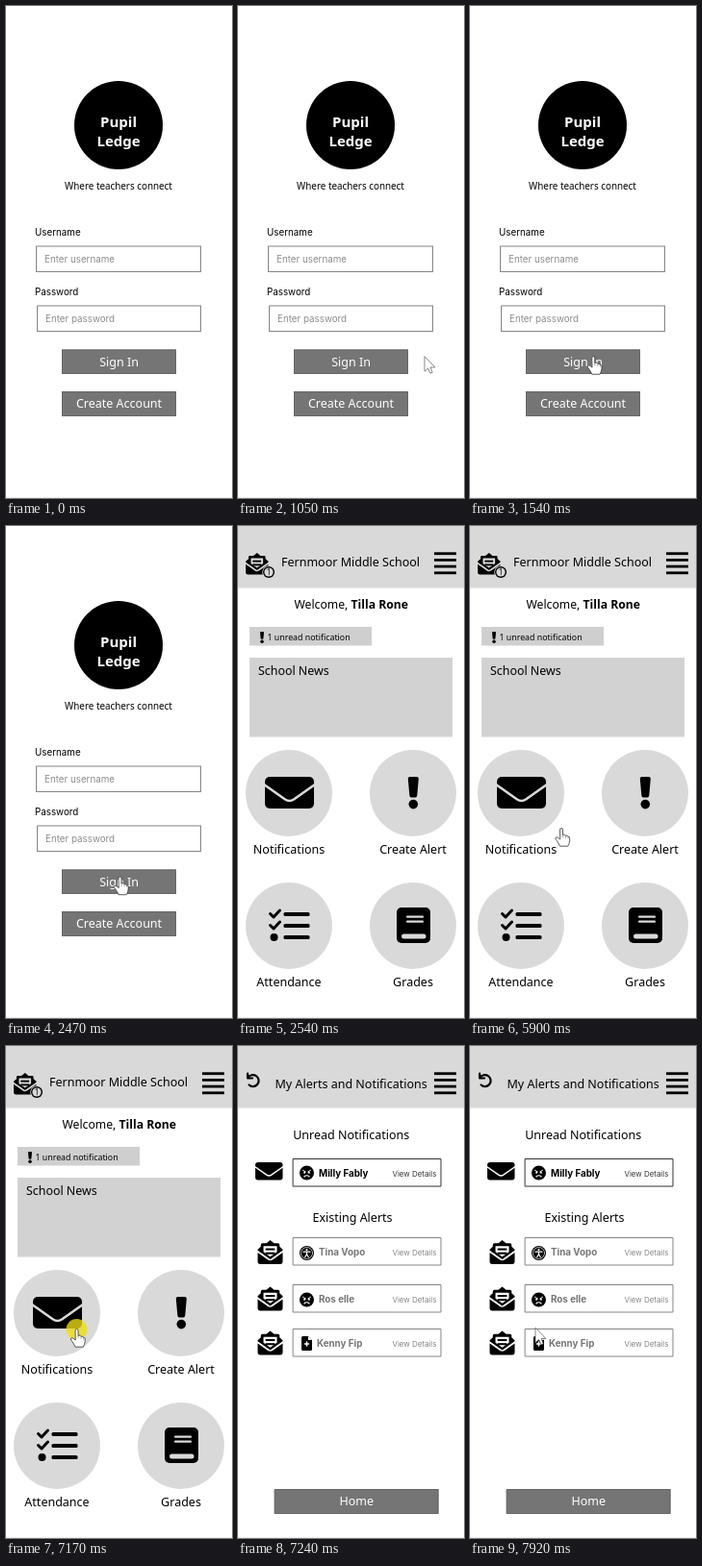
An HTML page with a canvas for the animation above (7990 ms loop, 235x512 px).

```html
<!DOCTYPE html>
<html lang="en">
<head>
<meta charset="utf-8">
<title>School app walkthrough</title>
<style>
html, body { margin: 0; width: 100%; height: 100%; overflow: hidden; background: #fff; }
canvas { display: block; width: 235px; height: 512px; }
</style>
</head>
<body>
<canvas></canvas>
<script>
const W = 235, H = 512, LOOP = 7990;
const PANEL = '#d9d9d9', GREY = '#757575';
const NOTO = '"Noto Sans", "Open Sans", sans-serif';
const INTER = 'Inter, Roboto, sans-serif';
const canvas = document.querySelector('canvas');
const ctx = canvas.getContext('2d');
const dpr = window.devicePixelRatio || 1;
canvas.width = W * dpr;
canvas.height = H * dpr;

function rect(x, y, w, h, color) {
  ctx.fillStyle = color;
  ctx.fillRect(x, y, w, h);
}

function frame(x, y, w, h, color) {
  ctx.strokeStyle = color;
  ctx.lineWidth = 1;
  ctx.strokeRect(x + 0.5, y + 0.5, w - 1, h - 1);
}

function disc(x, y, r, color = '#000') {
  ctx.fillStyle = color;
  ctx.beginPath();
  ctx.arc(x, y, r, 0, 7);
  ctx.fill();
}

function rounded(x, y, w, h, r, color = '#000') {
  ctx.fillStyle = color;
  ctx.beginPath();
  ctx.roundRect(x, y, w, h, r);
  ctx.fill();
}

function shape(d, color = '#000') {
  ctx.fillStyle = color;
  ctx.fill(new Path2D(d));
}

function line(d, width, color = '#000') {
  ctx.strokeStyle = color;
  ctx.lineWidth = width;
  ctx.lineCap = ctx.lineJoin = 'round';
  ctx.stroke(new Path2D(d));
}

function text(str, x, y, size, { color = '#000', weight = 400, family = NOTO, align = 'left' } = {}) {
  ctx.font = `${weight} ${size}px ${family}`;
  ctx.fillStyle = color;
  ctx.textAlign = align;
  ctx.fillText(str, x, y);
}

// Runs draw in a local coordinate system.
function at(x, y, scale, draw) {
  ctx.save();
  ctx.translate(x, y);
  ctx.scale(scale, scale);
  draw();
  ctx.restore();
}

function button(label, x, y, w, h) {
  rect(x, y, w, h, GREY);
  frame(x, y, w, h, '#676767');
  text(label, x + w / 2, y + 17, 12.5, { color: '#fff', align: 'center' });
}

function envelope(x, y, w, bg) {
  at(x, y, w / 51, () => {
    rounded(0, 0, 51, 33, 5);
    line('M-1 8 L21 23.5 Q25.5 26.5 30 23.5 L52 8', 2.6, bg);
  });
}

function openMail(x, y, w, bg) {
  at(x, y, w / 512, () => {
    shape('M0 211V190L64 135V96Q64 64 96 64H176L256 0L336 64H416Q448 64 448 96V135L512 190V211L256 392Z');
    shape('M118 122H394V240L256 338L118 240Z', bg);
    rect(160, 168, 192, 40, '#000');
    rect(160, 250, 192, 40, '#000');
    shape('M0 254L209 405Q256 432 303 405L512 254V440Q512 490 462 490H50Q0 490 0 440Z');
  });
}

function exclamation(x, y, scale) {
  at(x, y, scale, () => {
    shape('M-5.5 2Q-5.5 0 -3.5 0H3.5Q5.5 0 5.5 2L4 19Q3.8 21.5 2 21.5H-2Q-3.8 21.5 -4 19Z');
    disc(0, 28.6, 4.8);
  });
}

function checklist(x, y) {
  at(x, y, 1, () => {
    line('M1.5 4.5L5 8L11.5 1', 3);
    line('M1.5 16.5L5 20L11.5 13', 3);
    disc(5.5, 29, 4);
    for (const row of [3, 15, 27]) rounded(15.5, row, 27, 4, 1.5);
  });
}

function book(x, y) {
  rounded(x, y, 35, 37, 5);
  rounded(x + 10, y + 8.5, 18, 2.3, 1, PANEL);
  rounded(x + 10, y + 13.5, 18, 2.3, 1, PANEL);
  rounded(x + 5, y + 27.5, 25.5, 5, 2.5, PANEL);
}

function angryFace(x, y) {
  disc(x, y, 7.5);
  line(`M${x - 4} ${y - 2.7}l2.8 1.6M${x + 4} ${y - 2.7}l-2.8 1.6`, 1, '#fff');
  disc(x - 2.4, y - 0.3, 1, '#fff');
  disc(x + 2.4, y - 0.3, 1, '#fff');
  line(`M${x - 2.6} ${y + 4}q2.6 -2.6 5.2 0`, 1.1, '#fff');
}

function accessFigure(x, y) {
  disc(x, y, 7.5);
  ctx.beginPath();
  ctx.arc(x, y, 6, 0, 7);
  ctx.strokeStyle = '#fff';
  ctx.lineWidth = 0.7;
  ctx.stroke();
  disc(x, y - 3.4, 1.1, '#fff');
  line(`M${x - 3.5} ${y - 1.3}h7M${x} ${y - 1.3}v2.3M${x - 1.8} ${y + 4.2}l1.8 -3.2l1.8 3.2`, 1.2, '#fff');
}

function documentIcon(x, y) {
  at(x, y, 1, () => {
    shape('M0 1.5Q0 0 1.5 0H7L11 4V13.5Q11 15 9.5 15H1.5Q0 15 0 13.5Z');
    shape('M7 0V4H11Z', '#fff');
    line('M5.5 6V10M3.5 8H7.5', 1.5, '#fff');
  });
}

function header(title, x, y) {
  rect(0, 0, W, 64.5, PANEL);
  text(title, x, y, 12.5);
  for (let i = 0; i < 4; i++) rect(204, 27.3 + i * 6.7, 23, 2.8, '#000');
}

function field(label, hint, x, y, w, h) {
  text(label, 30, y - 10.5, 9.8, { family: INTER });
  frame(x, y, w, h, '#858585');
  text(hint, x + 9, y + h - 10, 9.8, { color: '#8c8c8c', family: INTER });
}

function signInScreen() {
  disc(117, 124, 46);
  const mark = { color: '#fff', weight: 700, align: 'center' };
  text('Pupil', 117, 126, 15, mark);
  text('Ledge', 117, 146, 15, mark);
  text('Where teachers connect', 117, 190.5, 9.85, { align: 'center' });
  field('Username', 'Enter username', 31, 249.5, 172, 27.5);
  field('Password', 'Enter password', 32, 311.5, 171, 27.5);
  button('Sign In', 58, 357.5, 119, 25.5);
  button('Create Account', 58, 401, 119, 26);
}

function homeScreen() {
  header('Fernmoor Middle School', 45, 42);
  openMail(8, 28, 23.5, PANEL);
  disc(32, 48, 6.8, PANEL);
  disc(32, 48, 6);
  disc(32, 48, 4.6, PANEL);
  text('1', 32, 51, 8, { align: 'center' });
  text('Welcome, ', 58.5, 86, 12.2);
  const nameX = 58.5 + ctx.measureText('Welcome, ').width;
  text('Tilla Rone', nameX, 86, 12.2, { weight: 700 });

  rect(12, 105, 127, 19.5, '#cfcfcf');
  exclamation(25, 110, 0.36);
  text('1 unread notification', 30.5, 118.5, 8.8);
  rect(12, 137, 211, 82.5, '#d2d2d2');
  text('School News', 21, 154.8, 12.4);

  const tiles = [
    ['Notifications', 53, 278], ['Create Alert', 182, 278],
    ['Attendance', 53, 416], ['Grades', 182, 416]
  ];
  for (const [label, x, y] of tiles) {
    disc(x, y, 45, PANEL);
    text(label, x, y + 63, 12.5, { align: 'center' });
  }
  envelope(28, 261, 51, PANEL);
  exclamation(182.3, 261, 1);
  checklist(32, 399);
  book(165, 397);
}

function alertRow(name, nameX, y, unread) {
  const border = unread ? '#333' : '#858585';
  frame(57, y, 154.5, 29.5, border);
  text(name, nameX, y + 18.6, 9.8, { color: unread ? '#000' : GREY, weight: 700, family: INTER });
  text('View Details', 160.5, y + 18.6, 7.9, { color: border, family: INTER });
}

function alertsScreen() {
  header('My Alerts and Notifications', 38.5, 44);
  line('M10 28.5V33.5H15M10.3 33.2A6 6 0 1 1 11.5 40.5', 2.2);
  text('Unread Notifications', 117.7, 96.7, 12.5, { align: 'center' });
  text('Existing Alerts', 119, 183, 12.5, { align: 'center' });
  envelope(18, 121, 28.5, '#fff');
  for (const y of [202, 250.5, 296.5]) openMail(20.5, y, 26, '#fff');
  alertRow('Milly Fably', 84, 117, true);
  alertRow('Tina Vopo', 84, 199);
  alertRow('Ros elle', 84, 248);
  alertRow('Kenny Fip', 82, 294);
  angryFace(71.5, 132);
  accessFigure(71.5, 215.5);
  angryFace(71.5, 264);
  documentIcon(66, 302);
  button('Home', 38, 461, 170.5, 26);
}

const ARROW = 'M0 0V15.2L3.6 12L5.9 17.2L8.2 16.2L6 11H10.5Z';
const HAND = 'M-2 1.6Q-2 0 -.5 0Q1 0 1 1.6V6.8Q3.4 6 4 7.8Q6 7 6.5 8.9Q8.2 8.5 8.2 10.3V13Q8 16 6.2 18.7H-2Q-3 15.7 -6 12Q-7.5 10 -6 9.3Q-4.5 8.9 -2 11.3Z';

// Pointer moves: start, end, steps, from, to.
const MOVES = [
  [500, 850, 6, [236, 377], [198, 366]],
  [1050, 1050, 1, [198, 366], [194, 365]],
  [1120, 1610, 8, [194, 365], [120, 364.5]],
  [1940, 1940, 1, [120, 364.5], [119.5, 365]],
  [4600, 4600, 1, [118, 364.5], [118, 364.5]],
  [4860, 5060, 3, [118, 364.5], [120, 360.5]],
  [5130, 5340, 4, [120, 360.5], [121, 365]],
  [5620, 5900, 5, [121, 365], [96, 314.5]],
  [5970, 6300, 6, [96, 314.5], [74.5, 294.5]],
  [7850, 7850, 1, [74, 293.5], [74, 293.5]],
  [7920, 7920, 1, [74, 293.5], [68, 293.5]]
];

function pointerAt(t) {
  const hidden = t < 500 || (t >= 2540 && t < 4600) || (t >= 7240 && t < 7850);
  if (hidden) return null;
  const [start, end, steps, from, to] = MOVES.filter(m => m[0] <= t).pop();
  const gap = steps > 1 ? (end - start) / (steps - 1) : 1;
  const step = Math.min(steps, Math.floor((t - start) / gap + 1e-6) + 1);
  const k = step / steps;
  return from.map((v, i) => v + (to[i] - v) * k);
}

function drawPointer(t) {
  const spot = pointerAt(t);
  if (!spot) return;
  const [x, y] = spot;
  const overButton = t < 2540 && x < 177;
  const overTile = t >= 4600 && t < 7240 && x < 104;
  const hand = overButton || overTile;
  const clicking = (t >= 2400 && t < 2470) || (t >= 7170 && t < 7240);
  if (clicking) disc(x - 1, y + 0.5, 11, 'rgba(240, 222, 20, 0.78)');
  at(hand ? x - 0.5 : x, y, 1, () => {
    const outline = hand ? HAND : ARROW;
    shape(outline, '#fff');
    line(outline, hand ? 0.8 : 0.7, hand ? '#333' : '#555');
    if (hand) line('M1 6.8V9.5M4 8V10M6.5 9V10.5', 0.5, '#555');
  });
}

function render(t) {
  ctx.setTransform(dpr, 0, 0, dpr, 0, 0);
  rect(0, 0, W, H, '#fff');
  if (t < 2540) signInScreen();
  else if (t < 7240) homeScreen();
  else alertsScreen();
  rect(0, H - 1, W, 1, '#efefef');
  drawPointer(t);
}

const begin = performance.now();
function tick() {
  render((performance.now() - begin) % LOOP);
  requestAnimationFrame(tick);
}
tick();
</script>
</body>
</html>
```
